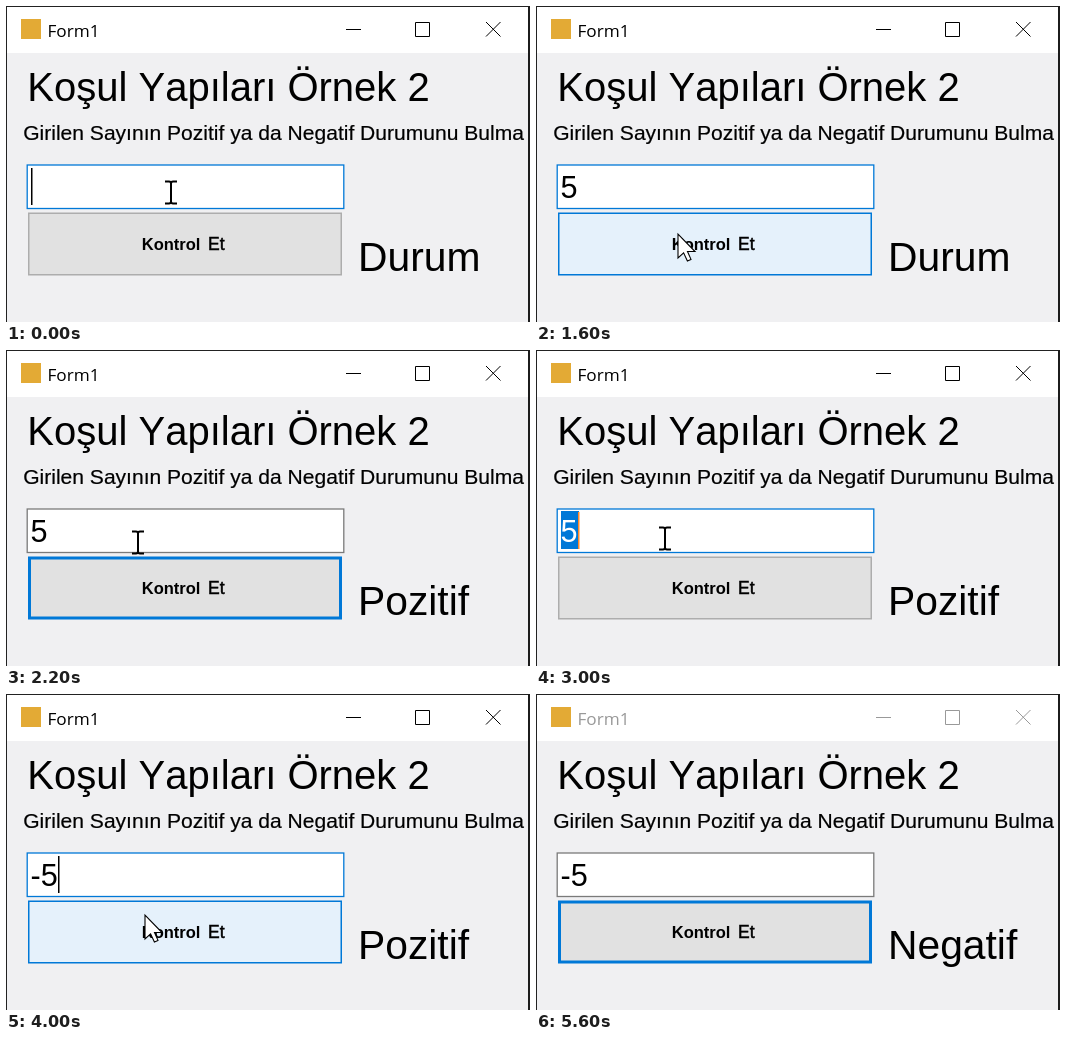
These frames come from a looping animation (524x316 px, 5800 ms). An HTML page:

```html
<!DOCTYPE html>
<html lang="tr">
<head>
<meta charset="utf-8">
<title>Form1</title>
<style>
html, body { margin: 0; width: 100%; height: 100%; overflow: hidden; background: #f0f0f2; }
svg { display: block; width: 524px; height: 316px; }
text { font-family: "Liberation Sans", Arial, sans-serif; font-kerning: none; fill: #000; white-space: pre; }
#caption { font-family: "Open Sans", sans-serif; }
</style>
</head>
<body>
<svg viewBox="0 0 524 316">
  <rect width="524" height="316" fill="#f0f0f2"/>
  <rect width="524" height="47" fill="#fff"/>
  <rect x="15" y="13" width="20" height="20" fill="#e3aa35"/>
  <text id="caption" x="41.5" y="31" font-size="17.2">Form1</text>
  <path id="controls" d="M340 23.5H355M409.5 16.5H423.5V30.5H409.5ZM480 16L494.5 30.5M494.5 16L480 30.5" fill="none" stroke-width="1"/>

  <text x="21.3" y="95" font-size="40">Koşul Yapıları Örnek 2</text>
  <text x="17.2" y="134" font-size="21.05" stroke="#000" stroke-width=".2">Girilen Sayının Pozitif ya da Negatif Durumunu Bulma</text>
  <text id="status" x="352" y="265" font-size="40.8"></text>

  <rect id="box" x="21.2" y="159" width="316.6" height="43.5" fill="#fff" stroke-width="1.3"/>
  <rect id="mark" x="25" y="161" width="18" height="38" fill="#0078d7"/>
  <text id="value" x="24.5" y="192" font-size="30.6"></text>
  <rect id="caret" y="162" width="1.5" height="37"/>

  <rect id="button"/>
  <text x="135.8" y="244" font-size="16.5" font-weight="700">Kontrol<tspan x="202" font-weight="400" font-size="17.5" stroke="#000" stroke-width=".5">Et</tspan></text>

  <path d="M0 .5H524M.5 0V316" stroke="#222"/>
  <path d="M523 0V316" stroke="#1c1c1c" stroke-width="2"/>

  <path id="beam" d="M-6 -10.5H-2Q0 -10.5 0 -8.5Q0 -10.5 2 -10.5H6M0 -9V10M-6 11.5H-2Q0 11.5 0 9.5Q0 11.5 2 11.5H6" fill="none" stroke="#000" stroke-width="2"/>
  <path id="arrow" d="M0 0V24L5.6 18.8L9.4 27L13 25.4L9.5 17.5H17Z" fill="#fff" stroke="#000" stroke-width="1.1"/>
</svg>
<script>
const LOOP = 5800, STEP = 200;
const el = id => document.getElementById(id);

// fill, border, border width
const LOOKS = {
  idle: ["#e1e1e1", "#adadad", 1.5],
  focus: ["#e1e1e1", "#0078d7", 3],
  hover: ["#e5f1fb", "#0078d7", 1.5],
  down: ["#cce4ff", "#005499", 1.5]
};

// time, pointer, x, y, then whatever changes
const STEPS = [
  [0, "beam", 165, 186, { text: "", caret: 1, look: "idle", box: "focus", status: "Durum", mark: 0, active: 1 }],
  [200, "beam", 164, 187],
  [400, "beam", 163, 188],
  [600, "beam", 160, 190, { caret: 0 }],
  [800, "beam", 156, 192],
  [1000, "beam", 153, 194, { caret: 1 }],
  [1200, "beam", 152, 195, { text: "5" }],
  [1400, "arrow", 148, 212, { look: "hover" }],
  [1600, "arrow", 142, 228, { caret: 0 }],
  [1800, "arrow", 140, 231, { look: "down" }],
  [2000, "arrow", 138, 225, { look: "hover", box: "plain", status: "Pozitif" }],
  [2200, "beam", 132, 192, { look: "focus" }],
  [2400, "beam", 130, 189],
  [2600, "beam", 129, 188, { look: "idle", box: "focus", caret: 1 }],
  [2800, "beam", 129, 188, { mark: 1, caret: 0 }],
  [3200, "beam", 129, 188, { mark: 0, text: "-", caret: 1 }],
  [3400, "beam", 130, 188, { text: "-5" }],
  [3600, "beam", 133, 192, { caret: 0 }],
  [3800, "arrow", 137, 212, { look: "hover", caret: 1 }],
  [4000, "arrow", 139, 221],
  [4200, "arrow", 140, 228, { look: "down", caret: 0 }],
  [4400, "arrow", 140, 230, { look: "hover", box: "plain", status: "Negatif" }],
  [4600, "arrow", 141, 234],
  [5000, "arrow", 146, 285, { look: "focus" }],
  [5200, "none", 0, 0],
  [5600, "none", 0, 0, { active: 0 }]
];

function stateAt(time) {
  const state = {};
  for (const [start, pointer, x, y, change] of STEPS) {
    if (start > time) break;
    Object.assign(state, { pointer, x, y }, change);
  }
  return state;
}

function set(id, attrs) {
  for (const key in attrs) el(id).setAttribute(key, attrs[key]);
}

function show(id, on) {
  el(id).style.display = on ? "" : "none";
}

function drawButton(look) {
  const [fill, stroke, width] = LOOKS[look];
  const half = width / 2;
  set("button", {
    x: 22 + half, y: 206.5 + half, width: 314 - width, height: 63 - width,
    fill, stroke, "stroke-width": width
  });
}

function draw(s) {
  el("value").textContent = s.text;
  el("value").style.fill = s.mark ? "#fff" : "#000";
  el("status").textContent = s.status;
  set("box", { stroke: s.box === "focus" ? "#0078d7" : "#7a7a7a" });
  drawButton(s.look);

  show("mark", s.mark);
  show("caret", s.caret || s.mark);
  const end = { "": 25, "5": 42, "-": 35, "-5": 52 }[s.text];
  set("caret", { x: end, fill: s.mark ? "#ff8728" : "#000" });

  el("caption").style.fill = s.active ? "#000" : "#999";
  set("controls", { stroke: s.active ? "#000" : "#999" });

  for (const id of ["beam", "arrow"]) {
    show(id, s.pointer === id);
    set(id, { transform: `translate(${s.x} ${s.y})` });
  }
}

const origin = performance.now();
let last = -1;
function tick() {
  const time = (performance.now() - origin) % LOOP;
  const slot = Math.floor(time / STEP);
  if (slot !== last) draw(stateAt(slot * STEP));
  last = slot;
  requestAnimationFrame(tick);
}
tick();
</script>
</body>
</html>
```
